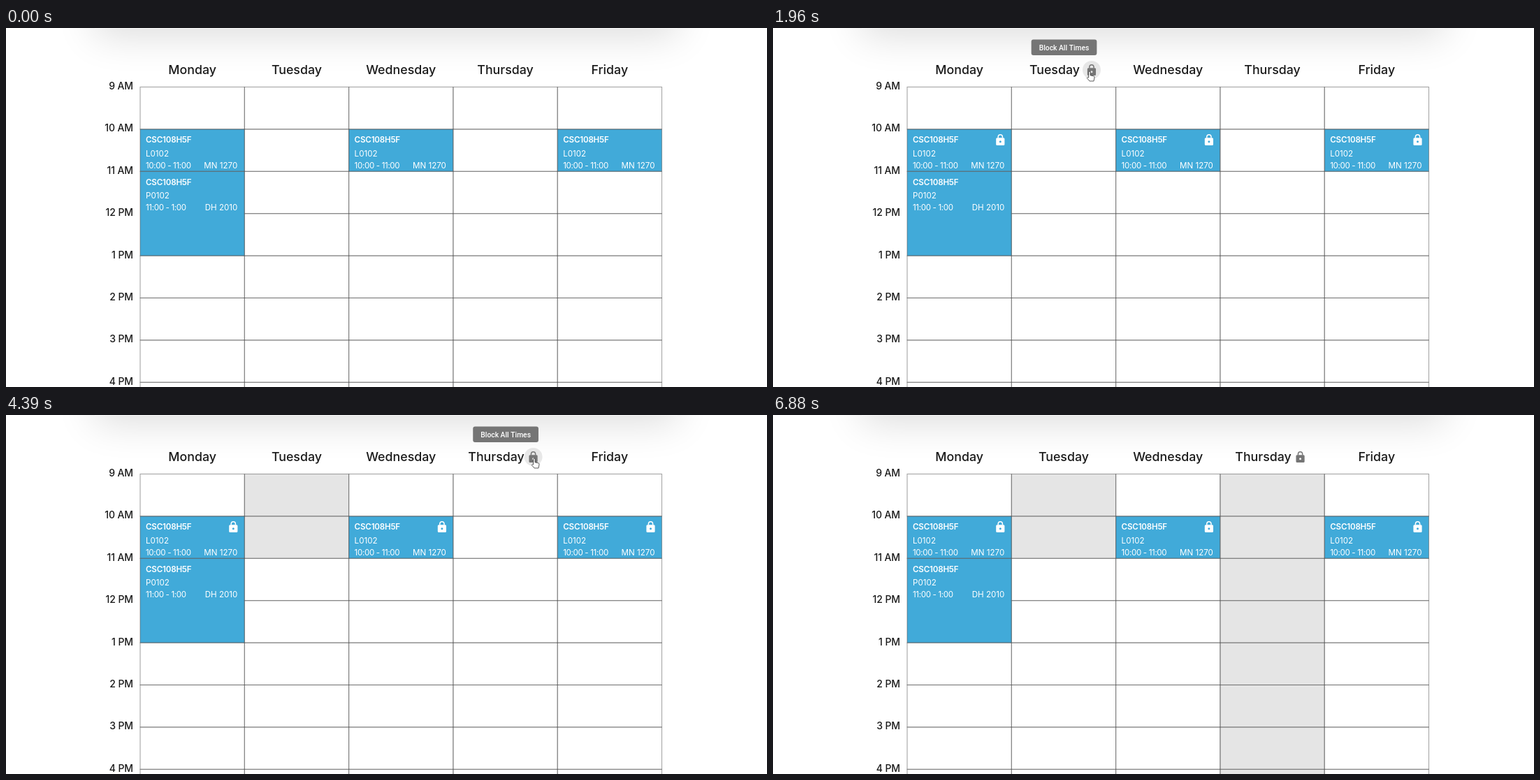
An HTML page with a canvas for the animation above (6.98 s loop, 1089 by 514 pixels).

```html
<!DOCTYPE html>
<html lang="en">
<head>
<meta charset="utf-8">
<title>Timetable</title>
<style>
html, body { margin: 0; width: 100%; height: 100%; overflow: hidden; background: #fff; }
canvas { display: block; }
</style>
</head>
<body>
<canvas id="stage" width="1089" height="514"></canvas>
<script>
const ctx = document.getElementById('stage').getContext('2d');
const LOOP = 6980, HOVER_LAG = 40;
const LEFT = 192, TOP = 84.5, COL = 149.3, ROW = 60.4, ROWS = 8;
const DAYS = ['Monday', 'Tuesday', 'Wednesday', 'Thursday', 'Friday'];
const SMALL = '11.6px Inter, sans-serif';

const lecture = col => ({ col, row: 1, span: 1, section: 'L0102', time: '10:00 - 11:00', room: 'MN 1270' });
const COURSES = [0, 2, 4].map(lecture).concat(
  { col: 0, row: 2, span: 2, section: 'P0102', time: '11:00 - 1:00', room: 'DH 2010' });

// Moments of the clicks, and the span in which the pointer is on screen
const CLICK = { course: 1240, tue9: 2340, tue10: 2900, thursday: 4780 };
const ENTER = 130, EXIT = 6880;
const START = { x: 1009, y: 504 };

// Eased pointer moves; "via" bends the way there
const MOVES = [
  { from: 130, to: 780, x: 342, y: 165 },
  { from: 780, to: 1010, x: 325, y: 158 },
  { from: 1240, to: 1880, x: 453, y: 62, via: { x: 459, y: 166 } },
  { from: 1960, to: 2980, x: 441, y: 168, via: { x: 453, y: 141 } },
  { from: 3273, to: 3680, x: 806, y: 35 },
  { from: 3720, to: 4150, x: 756, y: 62 },
  { from: 5660, to: 6580, x: 1068, y: 513 }
];

const HAND = new Path2D('M-1.3 9V1.2a1.2 1.2 0 0 1 2.4 0V5.8l4.6 1q1.5.4 1.3 2.2L6 14H0L-3.7 9.6q.6-1.8 2.4-.6z');
const ARROW = new Path2D('M0 0V11.5L2.6 9.2 4.3 13 6.1 12.2 4.5 8.5H7.8z');

const smooth = k => k * k * (3 - 2 * k);
const mix = (a, b, k) => ({ x: a.x + (b.x - a.x) * k, y: a.y + (b.y - a.y) * k });

function pointerAt(t) {
  if (t < ENTER || t >= EXIT) return null;
  let pos = START;
  for (const move of MOVES) {
    if (t < move.from) break;
    const k = smooth(Math.min(1, (t - move.from) / (move.to - move.from)));
    const via = move.via || mix(pos, move, .5);
    pos = mix(mix(pos, via, k), mix(via, move, k), k);
  }
  return pos;
}

const lockX = col => LEFT + (col + .5) * COL + 40;

// Grid cell under a point; row -1 is the day header
function cellAt(p) {
  if (!p) return {};
  const col = Math.floor((p.x - LEFT + 1) / COL);
  const row = p.y < 45 ? -2 : Math.max(-1, Math.floor((p.y - TOP) / ROW));
  if (col < 0 || col > 4 || row < -1) return {};
  return { col, row, onLock: row === -1 && Math.hypot(p.x - lockX(col), p.y - 60) < 14 };
}

function isBlocked(col, row, t) {
  if (col === 3) return t >= CLICK.thursday;
  return col === 1 && (row === 0 && t >= CLICK.tue9 || row === 1 && t >= CLICK.tue10);
}

function text(str, x, y, font, color, align = 'left', spacing = 0) {
  ctx.font = font;
  ctx.fillStyle = color;
  ctx.textAlign = align;
  ctx.letterSpacing = spacing + 'px';
  ctx.fillText(str, x, y);
}

function disc(x, y, r, color) {
  ctx.fillStyle = color;
  ctx.beginPath();
  ctx.arc(x, y, r, 0, 7);
  ctx.fill();
}

function lock(x, y, color) {
  ctx.fillStyle = ctx.strokeStyle = color;
  ctx.lineWidth = 1.5;
  ctx.beginPath();
  ctx.roundRect(x - 6.1, y - 2.7, 12.2, 10.7, 1.5);
  ctx.moveTo(x + 1.5, y + 2.7);
  ctx.arc(x, y + 2.7, 1.5, 0, 7);
  ctx.fill('evenodd');
  ctx.beginPath();
  ctx.arc(x, y - 4.2, 3.1, Math.PI, 0);
  ctx.lineTo(x + 3.1, y - 2.5);
  ctx.moveTo(x - 3.1, y - 4.2);
  ctx.lineTo(x - 3.1, y - 2.5);
  ctx.stroke();
}

function drawCard() {
  ctx.save();
  ctx.shadowColor = 'rgba(0,0,0,.14)';
  ctx.shadowBlur = 56;
  ctx.shadowOffsetY = 10;
  ctx.fillStyle = '#fff';
  ctx.fillRect(127, -150, 834, 150.5);
  ctx.restore();
}

function drawCell(col, row, t, hover) {
  const x = LEFT + col * COL, y = TOP + row * ROW;
  const blocked = isBlocked(col, row, t);
  const hovered = hover.col === col && hover.row === row;
  if (!blocked && !hovered) return;
  ctx.globalAlpha = blocked && hovered ? .8 : 1;
  ctx.fillStyle = '#e5e5e5';
  ctx.fillRect(x, y, COL, ROW);
  if (hovered) {
    text(blocked ? 'Unblock This Time' : 'Block This Time', x + COL / 2, y + 33.3,
      '300 12px Inter, sans-serif', '#333', 'center');
  }
  ctx.globalAlpha = 1;
}

function drawCourse(c, t) {
  const x = LEFT + c.col * COL, y = TOP + c.row * ROW;
  ctx.fillStyle = '#41aad9';
  ctx.fillRect(x, y, COL, ROW * c.span);
  text('CSC108H5F', x + 8, y + 19.3, '600 ' + SMALL, '#fff', 'left', -.2);
  text(c.section, x + 8, y + 38.6, SMALL, '#fff');
  text(c.time, x + 8, y + 56, SMALL, '#fff', 'left', -.35);
  text(c.room, x + COL - 10, y + 56, SMALL, '#fff', 'right');
  if (c.span > 1 || t < (c.col ? CLICK.course : 860)) return;
  if (!c.col && t >= CLICK.course && t < 1800) disc(x + 133.3, 160, 14, 'rgba(255,255,255,.07)');
  lock(x + 133.3, 160, '#fff');
}

// Each cell has its own border, so inner lines come out darker than the rim
function drawGrid() {
  ctx.strokeStyle = 'rgba(85,85,85,.53)';
  ctx.lineWidth = 1.1;
  const merged = COURSES.find(c => c.span > 1);
  for (let col = 0; col < DAYS.length; col++) {
    for (let row = 0; row < ROWS; row++) {
      const span = col === merged.col && row === merged.row ? merged.span : 1;
      ctx.strokeRect(LEFT + col * COL, TOP + row * ROW, COL, ROW * span);
      row += span - 1;
    }
  }
}

function drawTooltip(label, left) {
  ctx.font = '500 10.3px Roboto, sans-serif';
  ctx.letterSpacing = '0px';
  ctx.fillStyle = '#757575';
  ctx.beginPath();
  ctx.roundRect(left, 16.5, ctx.measureText(label).width + 22, 22.5, 3);
  ctx.fill();
  text(label, left + 11, 31.7, ctx.font, '#fff');
}

function drawHeader(col, t, hover) {
  const middle = LEFT + (col + .5) * COL;
  const allBlocked = isBlocked(col, ROWS - 1, t);
  const active = hover.col === col && hover.row === -1;
  const showLock = allBlocked || active;
  text(DAYS[col], middle - (showLock ? 13 : 0), 66, '500 17.8px Inter, sans-serif', '#1a1a1a', 'center');
  if (!showLock) return;
  const onLock = active && hover.onLock;
  if (onLock) disc(lockX(col), 60, 13, 'rgba(0,0,0,.09)');
  lock(lockX(col), 60, '#757575');
  if (onLock) drawTooltip(allBlocked ? 'Unblock All Times' : 'Block All Times', middle - 46.3);
}

function drawPointer(p) {
  if (!p) return;
  const cell = cellAt(p);
  const shape = cell.row >= 0 || cell.onLock ? HAND : ARROW;
  ctx.save();
  ctx.translate(p.x, p.y);
  ctx.fillStyle = '#fff';
  ctx.strokeStyle = '#333';
  ctx.lineWidth = .8;
  ctx.lineJoin = 'round';
  ctx.fill(shape);
  ctx.stroke(shape);
  ctx.restore();
}

function draw() {
  const t = performance.now() % LOOP;
  const hover = cellAt(pointerAt(t - HOVER_LAG));
  ctx.fillStyle = '#fff';
  ctx.fillRect(0, 0, 1089, 514);
  drawCard();
  for (let row = 0; row < ROWS; row++) {
    const hour = `${(row + 8) % 12 + 1} ${row < 3 ? 'AM' : 'PM'}`;
    text(hour, 182, TOP + row * ROW + 3.4, '500 14px Inter, sans-serif', '#1a1a1a', 'right', -.1);
    DAYS.forEach((_, col) => drawCell(col, row, t, hover));
  }
  COURSES.forEach(c => drawCourse(c, t));
  drawGrid();
  DAYS.forEach((_, col) => drawHeader(col, t, hover));
  drawPointer(pointerAt(t));
  requestAnimationFrame(draw);
}
draw();
</script>
</body>
</html>
```
